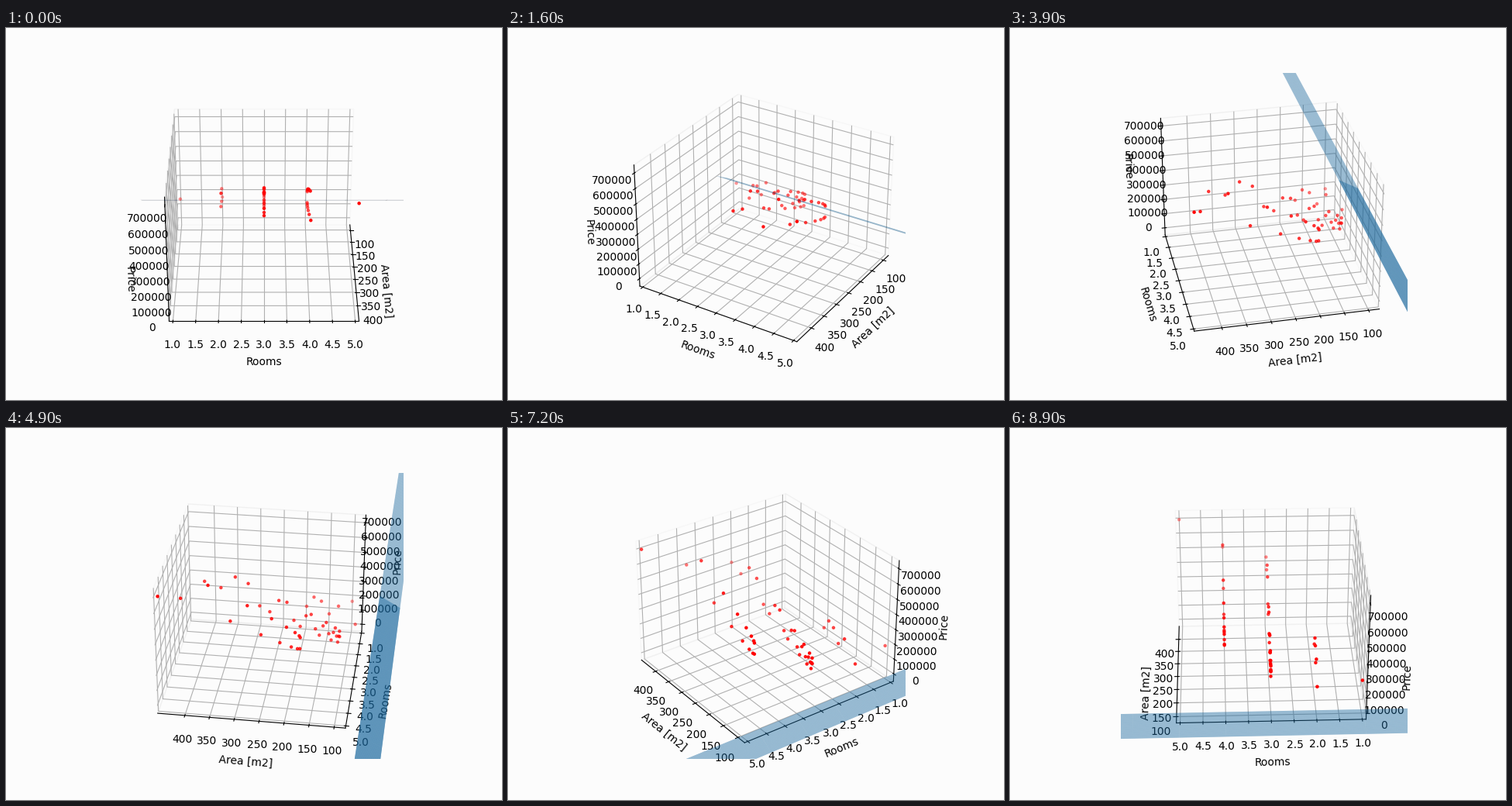
Animation, 640 px wide and 480 px high, one loop 9000 ms. Source, as a matplotlib script:

```python
import matplotlib.pyplot as plt
import numpy as np
from matplotlib.animation import FuncAnimation

FRAMES = 90
STEP = 2          # degrees of azimuth per frame
MARGIN = 1 / 48   # room left around the data on each axis
PAPER = "#fcfcfc"
SLOPE = 1654      # price per m2 on the fitted plane
TOP = 700000      # highest price


def homes(n_rooms, n, low, high, bend=1, swing=0, period=1, phase=0):
    """Areas growing from low to high, prices waving around a straight trend."""
    i = np.arange(n)
    t = i / max(n - 1, 1)
    area = low * (high / low) ** t**bend
    wave = swing * (1 + 1.5 * t) * np.cos(2 * np.pi * (i - phase) / period)
    price = 71000 + 1345 * area + 1000 * wave
    return area, np.full(n, n_rooms), price


groups = [
    homes(1, 1, 100, 100, swing=-36),
    homes(2, 6, 85.2, 188.8, bend=0.5, swing=32, period=2.5, phase=1),
    homes(3, 25, 110, 389, bend=1.75, swing=35, period=4.1, phase=1),
    homes(4, 14, 181, 421.5, bend=2.3, swing=35, period=2),
    homes(5, 1, 447.8, 447.8, swing=27),
]
area, rooms, price = np.hstack(groups)

fig = plt.figure(figsize=(6.4, 4.8), dpi=100, facecolor=PAPER)
ax = fig.add_subplot(projection="3d", facecolor=PAPER)
ax.scatter(area, rooms, price, c="r", marker=".")

gx, gy = np.meshgrid(range(len(area)), range(len(area)))
ax.plot_surface(gx, gy, SLOPE * gx, alpha=0.5)

ax.set_xlim(area.min(), area.max(), view_margin=MARGIN)
ax.set_ylim(1, 5, view_margin=MARGIN)
ax.set_zlim(-0.05 * TOP, 1.05 * TOP, view_margin=MARGIN)
ax.set_xticks(range(100, 401, 50))
ax.set_yticks(np.arange(1, 5.1, 0.5))
ax.set_zticks(range(0, TOP + 1, 100000))
ax.set_xlabel("Area [m2]")
ax.set_ylabel("Rooms")
ax.set_zlabel("Price")
for axis in (ax.xaxis, ax.yaxis, ax.zaxis):
    axis.pane.fill = False


def turn(i):
    ax.view_init(elev=30, azim=STEP * i)
    return ()


anim = FuncAnimation(fig, turn, frames=FRAMES, interval=100,
                     init_func=lambda: turn(0), repeat=True, repeat_delay=0)
plt.show()
```
